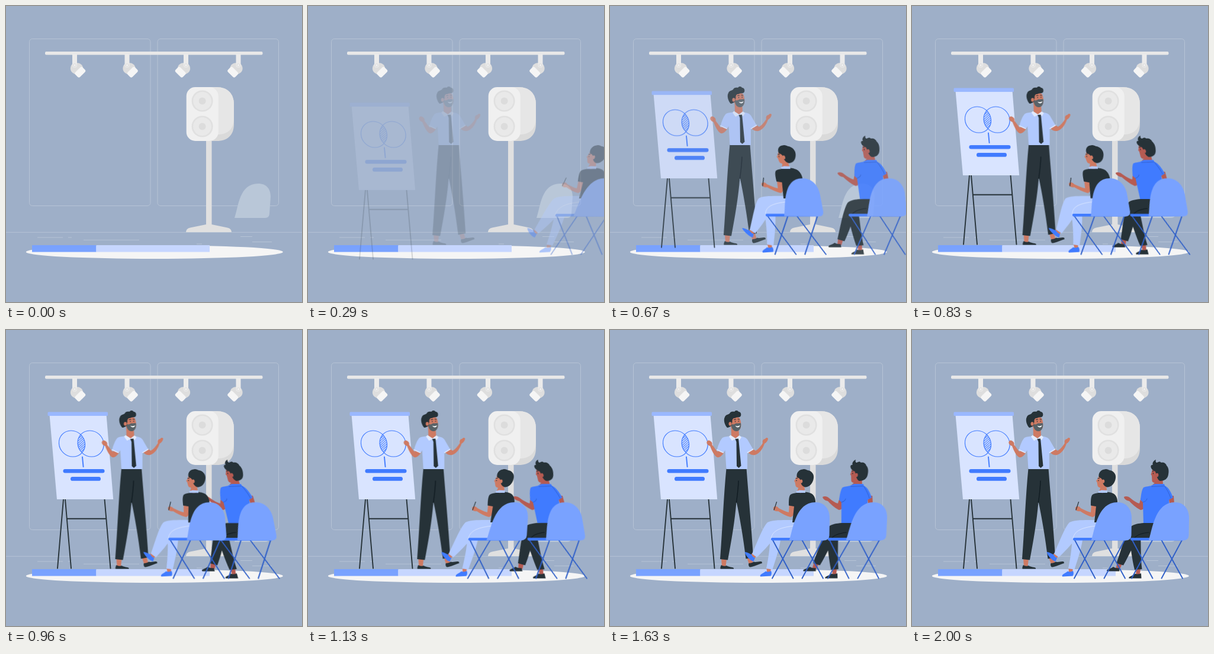
Write an HTML page without scripts that moves like this. It is 500 px wide and 500 px high and loops after 2040 ms.

```html
<!DOCTYPE html>
<html lang="en">
<head>
<meta charset="utf-8">
<title>Workshop talk</title>
<style>
html, body { margin: 0; width: 100%; height: 100%; overflow: hidden; background: #9eafc8; }
svg { display: block; width: 100vw; height: 100vh; }

.ink { fill: #263238; }
.blue { fill: #407bff; }
.pale { fill: #b2caff; }
.warm { fill: #ce7a63; }
.deep { fill: #b55b52; }
.line { fill: none; stroke-linecap: round; stroke-linejoin: round; }
.faint { fill: none; stroke: #b6c3d5; stroke-width: 1; }

/* the curve overshoots and applies to each keyframe interval */
.host, .guest { animation: slide 2040ms cubic-bezier(.36, -.01, .5, 1.38) infinite both; }
.board { animation: rise 2040ms cubic-bezier(.5, 0, .75, 1) infinite both; }
.guest { transform-origin: 0 327px; animation-name: rush; }
.late { transform-origin: 0 320px; animation-name: rush-late; }

@keyframes rise {
  0% { opacity: 0; transform: translateY(30px); }
  41.2%, 100% { opacity: 1; transform: translateY(0); }
}
@keyframes slide {
  0% { opacity: 0; transform: translateX(30px); }
  61.8%, 100% { opacity: 1; transform: translateX(0); }
}
@keyframes rush {
  0% { opacity: 0; transform: translateX(250px) skewX(-20deg); }
  42.2% { opacity: 1; transform: translateX(0) skewX(10deg); }
  56.9% { opacity: 1; transform: translateX(0) skewX(-2deg); }
  71.6%, 100% { opacity: 1; transform: translateX(0) skewX(0); }
}
@keyframes rush-late {
  0% { opacity: 0; transform: translateX(250px) skewX(-20deg); }
  56.9% { opacity: 1; transform: translateX(0) skewX(10deg); }
  76.5% { opacity: 1; transform: translateX(0) skewX(-2deg); }
  96.1%, 100% { opacity: 1; transform: translateX(0) skewX(0); }
}
</style>
</head>
<body>
<svg viewBox="0 0 500 500">
  <defs>
    <g id="lamp">
      <path fill="#dedede" d="M-7 104C-6 98-2 96 3 96C9 96 13 99 14 104L4 116C-3 115-8 110-7 104Z"/>
      <rect x="-8.700" y="-5.600" width="17.400" height="11.200" rx="3" fill="#f5f5f5" transform="translate(9.300 111.800) rotate(-45)"/>
      <path fill="#ebebeb" d="M-4 81H4V100A4 4 0 0 1-4 100Z"/>
      <circle cy="100" r="2.400" fill="#f0f0f0" stroke="#dadada"/>
    </g>
    <g id="cone">
      <circle r="18" fill="#e0e0e0"/>
      <circle r="15.400" fill="#e9e9e9"/>
      <circle r="6" fill="#dcdcdc"/>
    </g>
    <g id="chair">
      <path class="line" stroke="#2f5fc8" stroke-width="1.900" d="M275 355L309.500 419.500M309 355L274 419.500M324.500 355L360 419.500M359 355L324.500 419.500"/>
      <rect class="blue" x="272" y="351" width="90" height="4.600" rx="2"/>
      <path fill="#79a2ff" d="M303 355C309 338 313 291 347 291C363 291 371 303 371 318L370.500 347Q370 355.500 361 355.500Z"/>
    </g>
    <pattern id="hatch" width="2.700" height="2.700" patternUnits="userSpaceOnUse" patternTransform="rotate(-40)">
      <path stroke="#407bff" stroke-width="1.100" d="M0 1.350H2.700"/>
    </pattern>
  </defs>

  <!-- room -->
  <rect width="500" height="500" fill="#9eafc8"/>
  <rect class="faint" x="39.500" y="55.500" width="204.500" height="282" rx="5"/>
  <rect class="faint" x="256" y="55.500" width="204.500" height="282" rx="5"/>
  <path class="faint" d="M0 382.300H500M53 391H96M105 391H111M131 395.300H225M322 402H331M396 389.500H416M416 398.500H449"/>
  <rect x="66" y="77" width="367.500" height="5.500" rx="2" fill="#e8e8e8"/>
  <use href="#lamp" x="116"/>
  <use href="#lamp" x="204.500"/>
  <use href="#lamp" transform="translate(304) scale(-1 1)"/>
  <use href="#lamp" transform="translate(392.500) scale(-1 1)"/>
  <ellipse cx="250.800" cy="415.500" rx="217" ry="11.500" fill="#f5f5f5"/>
  <rect x="44" y="404" width="108.500" height="11.500" fill="#79a2ff"/>
  <rect x="152.500" y="404" width="191.500" height="11.500" fill="#c6d6ff"/>

  <!-- speaker -->
  <path fill="#e0e0e0" d="M338 226H347.500V369L374 374.500Q381 376 381 382H304Q304 376 311 374.500L338 369Z"/>
  <path fill="#dadada" d="M340 137H356C374 137 385 148 385 166V200C385 218 374 228 356 228H340Z"/>
  <path fill="#e6e6e6" d="M340 137H356C374 137 385 148 385 166V190C385 208 374 217 358 217H340Z"/>
  <rect x="304.700" y="137" width="54" height="91" rx="15" fill="#f0f0f0"/>
  <use href="#cone" x="331.600" y="160.500"/>
  <use href="#cone" x="331.600" y="203.500"/>
  <path fill="#b9c7d8" d="M386 358C393 338 394 300 426 300C440 300 447 309 447 322L445 351Q444.500 358 438 358Z"/>

  <!-- flip chart -->
  <g class="board">
    <path class="line" stroke="#263238" stroke-width="1.900" d="M97 286L87 402.500M100 286L110 402.500M166.500 286L176.500 402.500M103 318.800H169"/>
    <path fill="#d9e4ff" d="M73.500 143H169.500L181.200 286H86Z"/>
    <rect x="70.500" y="138.500" width="101.500" height="6.500" rx="1.500" fill="#9ab8ff"/>
    <g transform="translate(127.300 192) skewX(4)">
      <path fill="url(#hatch)" d="M0-15.400A22 22 0 0 1 0 15.400A22 22 0 0 1 0-15.400Z"/>
      <g class="line" stroke="#407bff" stroke-width="1.200">
        <circle cx="-15.800" r="22"/>
        <circle cx="15.800" r="22"/>
      </g>
    </g>
    <path class="line" stroke="#407bff" stroke-width="1.900" d="M129 214.500L130.600 231"/>
    <rect class="blue" x="96.500" y="235" width="70" height="6.600" rx="3.300"/>
    <rect class="blue" x="109" y="248" width="51" height="6.800" rx="3.400"/>
  </g>

  <!-- presenter -->
  <g class="host">
    <path class="warm" d="M188 386H197L195.500 400H189ZM231 384H239L242 394L235 396Z"/>
    <path class="ink" d="M188 397C191 399 194 399 197 398C201 401 207 400 209 402V403.500H186.500C186 401 187 399 188 397ZM234.500 394C238 394 241 393 242.500 391.500C247 393 252 390 256.500 391.500L257 394C250 396 243 400 236 400.500C234 399 233.500 396 234.500 394Z"/>
    <path class="ink" d="M196.500 234H230.500C234 280 239 335 242 384L229.500 386.500C225 350 219 315 213.500 290C211 322 205 357 199 388.500L186 387C190 335 192 280 196.500 234Z"/>
    <path class="line" stroke="#0f1a20" stroke-width="1.300" d="M217 255C216.500 270 215 280 213.500 291"/>
    <path class="warm" d="M183 201L193 206C190 212 185 216 181 215C176 212 172 204 169 196C165 195 162 191 164 188C165 186 168 186 170 188C172 189 173 191 172.500 194C176 198 179 203 182 206Z"/>
    <path class="warm" d="M232 205L240 200L246 204C251 201 255 196 258 191C257 187 259 184 262 184C264 181 267 182 267 184C266 188 264 190 261 192C258 201 252 209 245 211C239 212 235 209 232 205Z"/>
    <path class="pale" d="M202 179.500C209 178 216 178 222 180C230 181 232 184 235 190L242 202L232 207.500V235H196.500L194.500 203L191.500 208L180.500 203C183 194 186 186 190 182C194 180 198 180 202 179.500Z"/>
    <path class="line" stroke="#dce7ff" stroke-width="1.800" d="M181 202.500L191 207M241.500 201.500L232.500 207"/>
    <path class="warm" d="M204.500 160H217L218 179C215 184 209 184 205 180Z"/>
    <path fill="#e2ebff" d="M203.500 177.500L212 183L218.500 178L222 181L219 186L213 183.500L206 187L201 180Z"/>
    <path class="ink" d="M211.500 184L217 183.500L217.500 188L221.500 229.500L217.500 233L214 230L213.500 189Z"/>
    <path class="warm" d="M203 149C207 146 217 146 219 149C221 153 222 159 221 164C219 170 214 172 209 170C204 168 202 158 203 149Z"/>
    <path fill="#586267" d="M204.500 158C208 161 210 159 213 157.500C216 158 218 157 221 157.500C222 164 219.500 171 213.500 171C208 171 205 166 204.500 158Z"/>
    <path fill="#fff" d="M211.500 161.500C215 163 217 162.500 219.500 161C219 165 214 166 211.500 161.500Z"/>
    <path class="ink" d="M198 165C194 161 191 152 194 147C195 143 200 143 202 141C203 138 207 137 210 138C212 135 216 135.500 217 138C221 138 222 142 221 145C219 149 214 146 211 149C208 148 206 152 206.500 155L205 162C203 163 200 165 198 165Z"/>
    <ellipse class="warm" cx="203" cy="158.500" rx="2.500" ry="3.300"/>
    <path class="line" stroke="#263238" stroke-width="1.100" d="M209.500 151.500L212.500 151M216 150.500L218.500 151M211.500 154V155M217.200 153.500V154.500"/>
  </g>

  <!-- man in the back row -->
  <g class="guest late">
    <path class="deep" d="M347 392L355 395L351 404H344ZM378 402H386L385 413H378.500Z"/>
    <path class="ink" d="M340 400C343 402 346 402.500 350 402L350.500 407.500H329.500C327 404 336 403.500 340 400ZM377 411.500C380 413 384 412.500 387 411L387.500 419.500H366.500C365 416 373 415.500 377 411.500Z"/>
    <path class="ink" d="M368 340L386 345C387 365 386 385 388.500 404L376 405C372 388 368 365 368 340Z"/>
    <path class="ink" d="M412 324C392 326 375 326 369 333C361 344 353 372 345.500 394L357 397.500C366 382 373 366 379 353H415Z"/>
    <path class="line" stroke="#101b21" d="M374 353C380 345 390 343 400 342"/>
    <path class="deep" d="M387 283L399 290C396 298 391 304 386 304C378 300 372 294 367 289C362 288 358 285 358 282C361 280 366 281 369 284C375 289 380 292 384 293ZM433 280L442 280L443 293L436 298Z"/>
    <path class="blue" d="M405 263C413 261 421 261 427 263C434 266 438 275 441 283L434 287L436 326H391L390 291L386 287C387 278 388 270 391 266C396 264 400 264 405 263Z"/>
    <path class="line" stroke="#2f62d6" d="M390 291C393 290 396 289 397 285M427 264C431 270 435 277 437 284"/>
    <path class="deep" d="M411 246H423L424 261C419 266 411 266 406 262L411 257Z"/>
    <path class="blue" d="M403.500 263L410 260H426L427.500 264L405 266Z"/>
    <path class="line" stroke="#2f62d6" d="M405 264.500L426 263.500"/>
    <path class="deep" d="M407 233C405 238 405 241 403.500 244L405 246L405.500 255C407 259 412 259 416 256L421 246L415 233Z"/>
    <path class="ink" d="M406 236C402 232 403 227 407 228C405 224 409 220 412 219C411 222 412 224 414 224C417 222 420 222 420.500 224C425 223 429 225 430 229C434 233 434 239 433 244C432 251 427 255 419 255C415 253 414 249 413 245L411 239C409 238 408 237 406 236Z"/>
    <ellipse class="deep" cx="414" cy="245" rx="2.400" ry="3.200"/>
    <path class="line" stroke="#263238" stroke-width="1.100" d="M406 238.500L408.500 238M407.500 241.500V243"/>
    <use href="#chair" x="97"/>
  </g>

  <!-- woman in front -->
  <g class="guest">
    <path class="warm" d="M240 377L247 382L242 389L236 384ZM264.500 402H272L271 410H265Z"/>
    <path class="pale" d="M271 340H290C288 365 280 387 274.500 404.500L264 403C268 384 271 362 271 340Z"/>
    <path class="pale" d="M318 321C295 321 274 320 266 325C258 333 249 358 240 378L248 384C259 373 269 363 276 353H320Z"/>
    <path class="line" stroke="#dce7ff" stroke-width=".9" d="M272 352C274 341 283 334 310 331"/>
    <path class="blue" d="M227.500 375C232 375 236 378 239.500 379.500C240 382 242 384 245 385L242.500 391C237 390 229 381 227.500 375ZM263 407.500C266 409 269 408.500 272 407C273.500 410 273 413 271.500 415.500L254 416.500C252 413 259 411 263 407.500Z"/>
    <path class="warm" d="M303 294L315 296C313 305 311 315 305 316C297 314 290 310 284 306C279 307 275 304 276 300C278 297 282 297 285 301C291 304 297 307 302 308Z"/>
    <path class="line" stroke="#263238" stroke-width="1.200" d="M281.500 290.500L277 304"/>
    <path class="ink" d="M315 275C323 273 331 273 337 275C345 277 348 285 347 295L340 325H308L311 298L302 296.500C302 288 302 281 305 278C308 276 312 275.500 315 275Z"/>
    <path class="warm" d="M317 258H328L329 272C325 276 319 276 316 273L318 267Z"/>
    <path class="pale" d="M314.500 272.500L320 270.500L330 271V275H315Z"/>
    <path class="warm" d="M316 246C314 250 313.500 252 311 255L312.500 257L313.500 263C315 267 319 267 323 264L327 250Z"/>
    <path class="ink" d="M316 249C314 243 318 236 325 235.500C328 234 332 236 334 237C341 238 345 244 344 250C343 258 338 265 330 265.500C325 265 322 260 322 255C321 252 320 250 316 249Z"/>
    <ellipse class="warm" cx="323" cy="255.500" rx="2.300" ry="3.100"/>
    <path class="line" stroke="#263238" stroke-width="1.100" d="M314 250.500L316.500 250.500M315 253.500V254.700"/>
    <use href="#chair"/>
  </g>
</svg>
</body>
</html>
```
